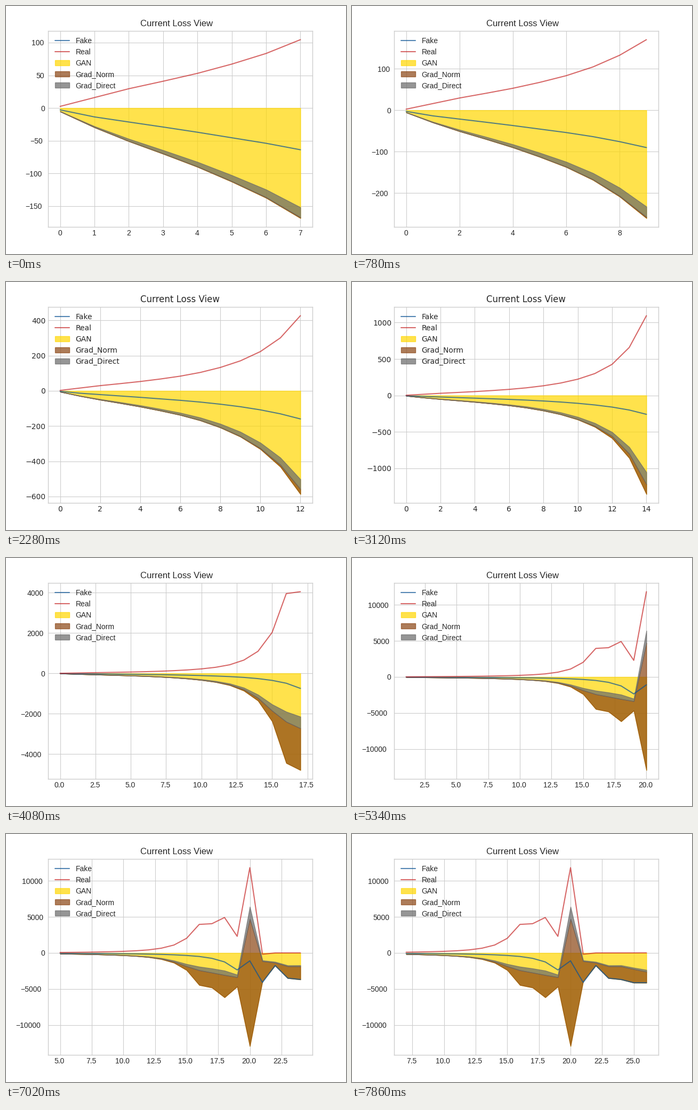
A matplotlib script for the animation above (8000 ms loop, 638 by 467 pixels).

```python
import numpy as np
import matplotlib.pyplot as plt
from matplotlib.animation import FuncAnimation
from matplotlib.transforms import Affine2D

WIDTH, HEIGHT, DPI = 638, 467, 100
LOOP_MS, STEP_MS = 8000, 40
WINDOW = 20       # points kept in view
FIRST_COUNT = 8   # points shown at the start
FIRST_REDRAW, PERIOD = 210, 416
HOLD, LONG_HOLD = 135, 270
ALPHA = 0.7
STEPS = np.arange(27)


def curve(*points):
    """Monotone cubic through key points on an arcsinh scale."""
    x, y = np.array(points, float).T
    y = np.arcsinh(y)
    gap = np.diff(x)
    secant = np.diff(y) / gap
    left, right = secant[:-1], secant[1:]
    same_sign = left * right > 0
    inner = np.where(same_sign,
                     2 * left * right / np.where(same_sign, left + right, 1), 0)
    slope = np.concatenate([secant[:1], inner, secant[-1:]])

    i = np.clip(np.searchsorted(x, STEPS, side="right") - 1, 0, len(gap) - 1)
    t = (STEPS - x[i]) / gap[i]
    ease = t * t * (3 - 2 * t)
    bend = gap[i] * t * (1 - t) * (slope[i] * (1 - t) - slope[i + 1] * t)
    return np.sinh(y[i] + (y[i + 1] - y[i]) * ease + bend)


fake = curve((0, -2.8), (1, -13.6), (4, -37), (7, -63.8), (10, -108),
             (13, -200), (16, -488), (18, -1240), (19, -2350), (20, -1090),
             (21, -4085), (22, -1740), (23, -3490), (24, -3675),
             (25, -4120), (26, -4120))
real = curve((0, 2.5), (1, 16), (2, 29.5), (4, 53), (7, 104.5), (10, 223),
             (12, 427), (14, 1095), (15, 2030), (16, 3955), (17, 4050),
             (18, 4910), (19, 2300), (20, 11810), (21, -180), (22, 0), (26, 15))
norm = curve((0, 0.1), (7, 1.2), (10, 5), (12, 28), (14, 135), (15, 525),
             (16, 2043), (17, 2070), (18, 3090), (19, 1290), (20, 17600),
             (21, 2755), (22, 390), (23, 1640), (25, 1885), (26, 1535))
direct = curve((0, 0.2), (2, 3.4), (7, 15.3), (12, 56), (14, 165), (16, 500),
               (18, 615), (19, 345), (20, 1700), (21, 120), (23, 130), (26, 260))
gan = fake - real
levels = [np.zeros(len(STEPS)), gan, gan + norm, gan + norm + direct]

plt.style.use("seaborn-v0_8-whitegrid")
plt.rcParams["font.family"] = "DejaVu Sans"
fig = plt.figure(figsize=(WIDTH / DPI, HEIGHT / DPI), dpi=DPI, facecolor="white")
ax = fig.add_axes([79 / WIDTH, 50.8 / HEIGHT, 496 / WIDTH, 369.6 / HEIGHT])
shown = None


def narrow_text(legend):
    """Switch to the narrower font, keeping each text's left edge in place."""
    fig.draw_without_rendering()
    for text in [ax.title, *ax.get_xticklabels(), *ax.get_yticklabels(),
                 *legend.get_texts()]:
        left = text.get_window_extent().x0
        text.set_family("Liberation Sans")
        shift = left - text.get_window_extent().x0
        text.set_transform(text.get_transform() + Affine2D().translate(shift, 0))


def draw_view(count, wide):
    x = STEPS[max(0, count - WINDOW):count]
    ax.clear()
    for data, color, label in ((fake, "#0b5394", "Fake"),
                               (real, "#c62828", "Real")):
        ax.plot(x, data[x], color=color, alpha=ALPHA, lw=1.5, label=label)
    bands = (("gold", "GAN"), ("saddlebrown", "Grad_Norm"),
             ("dimgray", "Grad_Direct"))
    for low, high, (color, label) in zip(levels, levels[1:], bands):
        ax.fill_between(x, low[x], high[x], color=color, alpha=ALPHA, label=label)
    ax.set_title("Current Loss View")
    legend = ax.legend(loc="upper left")
    if not wide:
        narrow_text(legend)


def view_at(now):
    """Point count, and whether the wide font shows before the next point."""
    turn, since = divmod(now - FIRST_REDRAW, PERIOD)
    if turn < 0:
        return FIRST_COUNT, False
    hold = LONG_HOLD if turn and turn % 5 == 0 else HOLD
    wide = since < hold
    return FIRST_COUNT + int(turn) + (not wide), wide


def update(frame):
    global shown
    view = view_at((frame + 0.5) * STEP_MS)
    if view != shown:
        draw_view(*view)
        shown = view
    return []


anim = FuncAnimation(fig, update, frames=LOOP_MS // STEP_MS,
                     interval=STEP_MS, repeat=True, repeat_delay=0)
plt.show()
```
